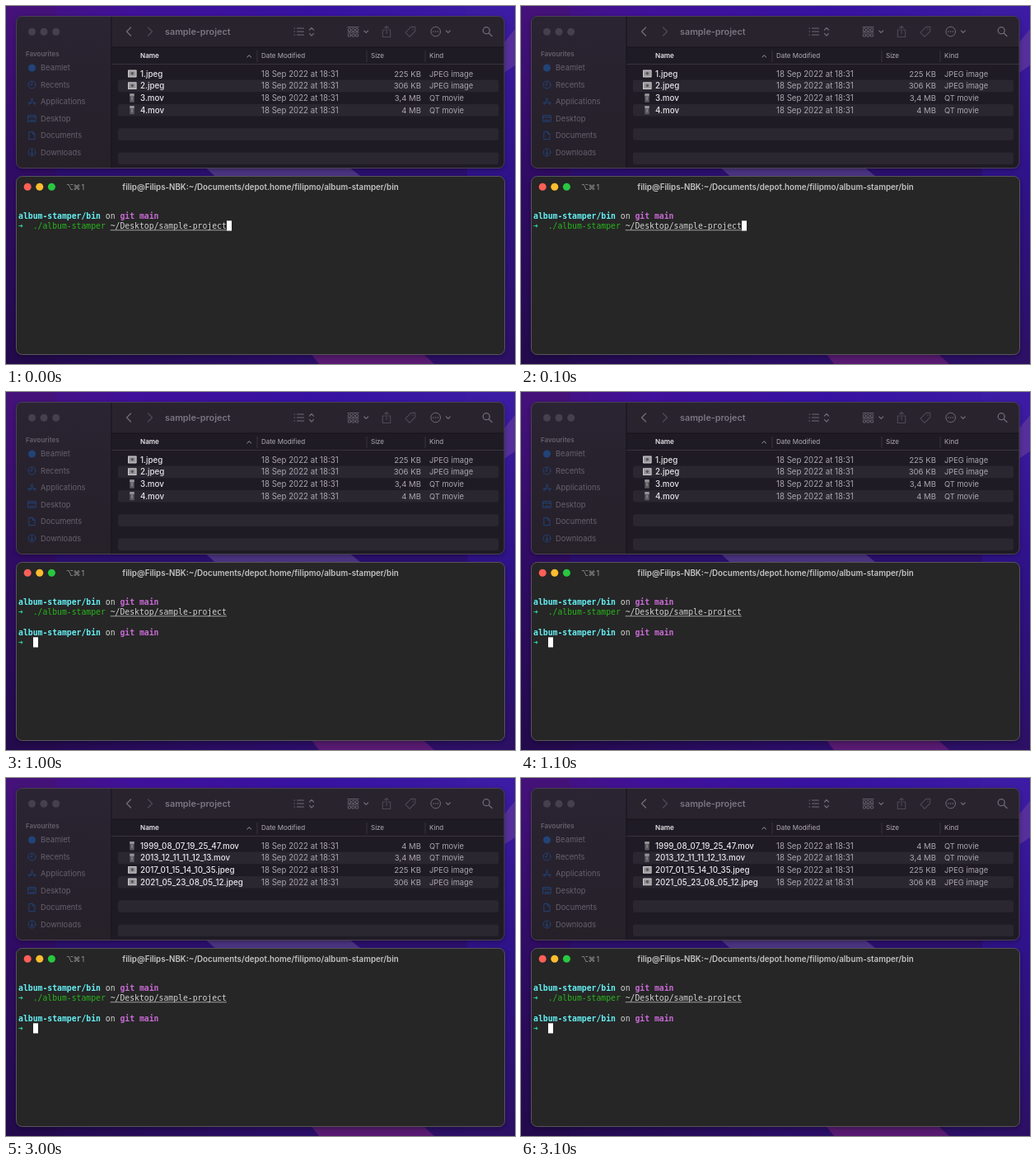
An HTML page for the animation above (3.4 s loop, 618 by 434 pixels).

```html
<!DOCTYPE html>
<html lang="en">
<head>
<meta charset="utf-8">
<title>Batch rename</title>
<style>
  html, body { margin: 0; width: 100%; height: 100%; overflow: hidden; background: #2a0f5c; }
  svg { display: block; width: 618px; height: 434px; }
  text { font-family: Inter, Roboto, sans-serif; white-space: pre; }
  .mono { font: 9.77px "DejaVu Sans Mono", "Liberation Mono", monospace; }
  .bold { font-weight: 700; }
  .semi { font-weight: 600; }
  .medium { font-weight: 500; }
  .line { fill: none; stroke-linecap: round; stroke-linejoin: round; }
</style>
</head>
<body>
<svg id="stage" viewBox="0 0 618 434" xmlns="http://www.w3.org/2000/svg">
  <defs>
    <linearGradient id="sky" x1="0" y1="0" x2="1" y2="0">
      <stop offset="0" stop-color="#45127a"/>
      <stop offset=".25" stop-color="#40119a"/>
      <stop offset=".6" stop-color="#3712a2"/>
      <stop offset="1" stop-color="#3c1ca4"/>
    </linearGradient>
    <linearGradient id="left" x1="0" y1="0" x2="0" y2="1">
      <stop offset="0" stop-color="#45127a"/>
      <stop offset=".4" stop-color="#320c68"/>
      <stop offset="1" stop-color="#220a4c"/>
    </linearGradient>
    <linearGradient id="right" x1="0" y1="0" x2="0" y2="1">
      <stop offset="0" stop-color="#3c1ca4"/>
      <stop offset=".5" stop-color="#2e1288"/>
      <stop offset="1" stop-color="#2c1064"/>
    </linearGradient>
    <linearGradient id="ground" x1="0" y1="0" x2="1" y2="0">
      <stop offset="0" stop-color="#220a4c"/>
      <stop offset=".55" stop-color="#2a0d66"/>
      <stop offset="1" stop-color="#2c1064"/>
    </linearGradient>
    <linearGradient id="side" x1="0" y1="0" x2="0" y2="1">
      <stop offset="0" stop-color="#2a2433"/>
      <stop offset="1" stop-color="#262029"/>
    </linearGradient>
    <clipPath id="finderClip"><rect x="12.5" y="12.5" width="592.5" height="184" rx="7"/></clipPath>
    <filter id="shade" x="-5%" y="-10%" width="110%" height="125%">
      <feDropShadow dx="0" dy="2" stdDeviation="3" flood-color="#000" flood-opacity=".35"/>
    </filter>
  </defs>
  <g id="wall"></g>
  <g id="finder"></g>
  <g id="term"></g>
</svg>
<script>
const LOOP = 3400, COL = 5.88, LEFT = 15;
const $ = id => document.getElementById(id);

const text = (x, y, s, size, fill, cls = '', anchor = 'start') =>
  `<text x="${x}" y="${y}" font-size="${size}" fill="${fill}" class="${cls}" text-anchor="${anchor}">${s}</text>`;
const rect = (x, y, w, h, fill, rx = 0) =>
  `<rect x="${x}" y="${y}" width="${w}" height="${h}" rx="${rx}" fill="${fill}"/>`;
const dot = (x, y, r, fill) => `<circle cx="${x}" cy="${y}" r="${r}" fill="${fill}"/>`;
const line = (d, stroke, w = 1) =>
  `<path class="line" d="${d}" stroke="${stroke}" stroke-width="${w}"/>`;
const frame = (x, y, w, h, stroke) =>
  `<rect x="${x}" y="${y}" width="${w}" height="${h}" rx="7" fill="none" stroke="${stroke}"/>`;
const panel = (x, y, w, h, fill) =>
  `<rect x="${x}" y="${y}" width="${w}" height="${h}" rx="7" fill="${fill}" filter="url(#shade)"/>`;

function wallpaper() {
  return rect(0, 0, 618, 434, 'url(#ground)') +
    rect(0, 0, 618, 60, 'url(#sky)') +
    rect(0, 0, 60, 434, 'url(#left)') +
    rect(558, 0, 60, 434, 'url(#right)') +
    rect(60, 190, 500, 24, '#2c0f70') +
    '<path d="M236 190H410L440 214H262Z" fill="#4c3484"/>' +
    '<path d="M618 28L600 50V84L618 72Z" fill="#55309c"/>' +
    '<path d="M366 416H500L520 434H380Z" fill="#571a70"/>';
}

function sidebar() {
  const ink = '#66606d', blue = '#214377';
  const names = ['Beamlet', 'Recents', 'Applications', 'Desktop', 'Documents', 'Downloads'];
  const icons = [
    dot(31.5, 75, 4.5, blue),
    line('M36 95.5A4.5 4.5 0 1 1 27 95.5A4.5 4.5 0 1 1 36 95.5M31.5 92.8V95.7H29.5', blue),
    line('M28 120L32.3 111.8M30.7 111.8L35.3 120M26.8 117.4H31.8M34 117.4H36.4', blue),
    line('M27 132.6H36.2V140.2H27ZM27 134.8H36.2M29 138.4H34.2', blue),
    line('M28.2 152.4H32.4L35 155V161.6H28.2ZM32.2 152.6V155.2H34.8', blue),
    line('M36 177.5A4.5 4.5 0 1 1 27 177.5A4.5 4.5 0 1 1 36 177.5M31.5 175V180M29.5 178.2L31.5 180L33.5 178.2', blue)
  ];
  return text(24, 61, 'Favourites', 8, '#66606d', 'semi') +
    names.map((n, i) => icons[i] + text(42, 78.4 + i * 20.5, n, 9.35, ink)).join('');
}

function toolbar() {
  const c = '#706a76', dim = '#4d4854';
  let s = line('M151.5 26L146.5 31L151.5 36', c, 1.4) + line('M172.5 26L177.5 31L172.5 36', dim, 1.4) +
    text(193, 35, 'sample-project', 10.8, '#7b7581', 'semi');
  for (const y of [27, 31, 35]) s += line(`M350 ${y}H350.6M353.5 ${y}H361.5`, c, 1.2);
  s += line('M368.5 29L371 26.4L373.5 29M368.5 33.4L371 36L373.5 33.4', c, 1.2);
  for (const y of [25.5, 32]) {
    s += line(`M415 ${y}H428`, c, .9);
    for (let i = 0; i < 3; i++)
      s += `<rect x="${415.3 + i * 4.6}" y="${y + 2}" width="3.2" height="3" rx=".6" fill="none" stroke="${c}" stroke-width=".9"/>`;
  }
  s += line('M434.8 30L437.2 32.4L439.6 30', c, 1.2) +
    line('M460 29H457.3V37.5H466.7V29H464M462 33.5V24.4M459.6 26.6L462 24.3L464.4 26.6', dim, 1.1) +
    line('M485 32.2L491.7 25.4H496.8V30.5L490 37.3Z', dim, 1.1) + dot(494, 28.2, .8, dim) +
    `<circle cx="521.7" cy="31" r="5.8" fill="none" stroke="${c}"/>`;
  for (const x of [519, 521.7, 524.4]) s += dot(x, 31, .8, c);
  return s + line('M534.4 30L536.8 32.4L539.2 30', c, 1.2) +
    line('M587.2 29.7A4 4 0 1 1 579.2 29.7A4 4 0 1 1 587.2 29.7M586.2 32.8L590 36.5', c, 1.3);
}

function fileIcon(kind, y) {
  return kind === 'jpeg'
    ? rect(148, y - 4.6, 10.6, 8.8, '#cfcdd1', .6) + rect(149, y - 3.6, 8.6, 6.8, '#99979b') +
      dot(153.3, y - .4, 1.8, '#57555a')
    : rect(150.3, y - 5.2, 5.4, 10.4, '#5d5a60', .5) + rect(150.3, y - 5.2, 5.4, 3, '#969398', .5) +
      rect(152, y - 1.4, 2, 4, '#7d7a80');
}

function files(list) {
  const soft = '#aaa6ae';
  return list.map(([name, size], i) => {
    const y = 82.2 + i * 14.65, base = y + 3.5, kind = name.split('.')[1];
    return fileIcon(kind, y) + text(163, base, name, 9.75, '#e9e7eb', 'medium') +
      text(310, base, '18 Sep 2022 at 18:31', 9.7, soft) +
      text(504, base, size, 9.6, soft, '', 'end') +
      text(514, base, kind === 'jpeg' ? 'JPEG image' : 'QT movie', 9.3, soft);
  }).join('');
}

function finder() {
  let s = rect(12.5, 12.5, 592.5, 184, '#1f1b25') + rect(12, 12, 116, 185, 'url(#side)') +
    rect(128, 12, 478, 38, '#29232e') + rect(127.5, 12, 1, 185, '#15121a') +
    rect(128, 49.5, 478, 1, '#151219') + rect(128, 70, 478, 1, '#37323c');
  for (const x of [31.5, 46, 60.7]) s += dot(x, 31.3, 4.5, '#463f4d');
  for (const x of [304.5, 437.5, 508.5]) s += rect(x, 54, 1, 14, '#38333d');
  for (let i = 0; i < 4; i++) s += rect(136, 89.6 + i * 29.3, 462, 14.6, '#2b2731', 3);
  s += text(163, 63, 'Name', 8.1, '#e6e4e8', 'semi') + line('M292.8 62L295.2 59.7L297.6 62', '#a19da5') +
    [[310, 'Date Modified'], [443, 'Size'], [514, 'Kind']].map(([x, n]) => text(x, 63, n, 8, '#b1adb5')).join('');
  return panel(12.5, 12.5, 592.5, 184, '#1f1b25') +
    `<g clip-path="url(#finderClip)">${s}</g>` + sidebar() + toolbar() +
    `<g id="before">${files([['1.jpeg', '225 KB'], ['2.jpeg', '306 KB'], ['3.mov', '3,4 MB'], ['4.mov', '4 MB']])}</g>` +
    `<g id="after">${files([['1999_08_07_19_25_47.mov', '4 MB'], ['2013_12_11_11_12_13.mov', '3,4 MB'],
      ['2017_01_15_14_10_35.jpeg', '225 KB'], ['2021_05_23_08_05_12.jpeg', '306 KB']])}</g>` +
    frame(12.5, 12.5, 592.5, 184, '#49424f');
}

const mono = (col, y, s, fill, cls = '') => text(LEFT + col * COL, y, s, 9.77, fill, 'mono ' + cls);

const prompt = y =>
  mono(0, y, 'album-stamper/bin', '#65eff3', 'bold') + mono(18, y, 'on', '#d5d5d5') +
  mono(21, y, 'git main', '#c86bd5', 'bold') + mono(0, y + 12.4, '➜', '#30d5a4', 'bold');

function terminal() {
  const path = LEFT + 19 * COL;
  return panel(12.5, 206.5, 593, 216, '#262626') +
    frame(12.5, 206.5, 593, 216, '#58555b') +
    dot(26.2, 219.3, 4.5, '#fe5f57') + dot(40.8, 219.3, 4.5, '#febc2e') + dot(55.4, 219.3, 4.5, '#28c840') +
    [[73, '⌥'], [81.5, '⌘'], [91.5, '1']].map(([x, c]) =>
      `<text x="${x}" y="222.8" font-size="9" fill="#9a9a9a" style="font-family:Inter,'DejaVu Sans',sans-serif">${c}</text>`).join('') +
    '<text id="title" x="309" y="222.7" font-size="9.75" fill="#c4c4c4" class="semi" text-anchor="middle"></text>' +
    prompt(257.6) + mono(3, 270, './album-stamper', '#28b51e') +
    mono(19, 270, '~/Desktop/sample-project', '#d0d0d0') +
    rect(path, 271.4, 24 * COL, .8, '#bdbdbd') +
    `<g id="done">${prompt(294.9)}</g>` +
    '<rect id="cursor" width="6" height="12.2" fill="#fff"/>';
}

$('wall').innerHTML = wallpaper();
$('finder').innerHTML = finder();
$('term').innerHTML = terminal();

const HOME = 'filip@Filips-NBK:~/Documents/depot.home/filipmo/album-stamper/bin';
const RUN = './album-stamper ~/Desktop/sample-project';
const steps = [
  { at: 0, title: HOME, col: 43, y: 260.3 },
  { at: 800, title: RUN, col: 0, y: 272.6 },
  { at: 1000, title: HOME, col: 3, y: 297.3, done: true },
  { at: 1200, title: HOME, col: 3, y: 297.3, done: true, renamed: true }
];
const show = (id, on) => $(id).setAttribute('visibility', on ? 'visible' : 'hidden');

let current;
function draw(now) {
  const t = now % LOOP;
  const step = steps.filter(s => s.at <= t).pop() || steps[0];
  if (step !== current) {
    current = step;
    $('title').textContent = step.title;
    $('cursor').setAttribute('x', Math.round(LEFT + step.col * COL));
    $('cursor').setAttribute('y', step.y);
    show('done', step.done);
    show('before', !step.renamed);
    show('after', step.renamed);
  }
  requestAnimationFrame(draw);
}
draw(0);
</script>
</body>
</html>
```
